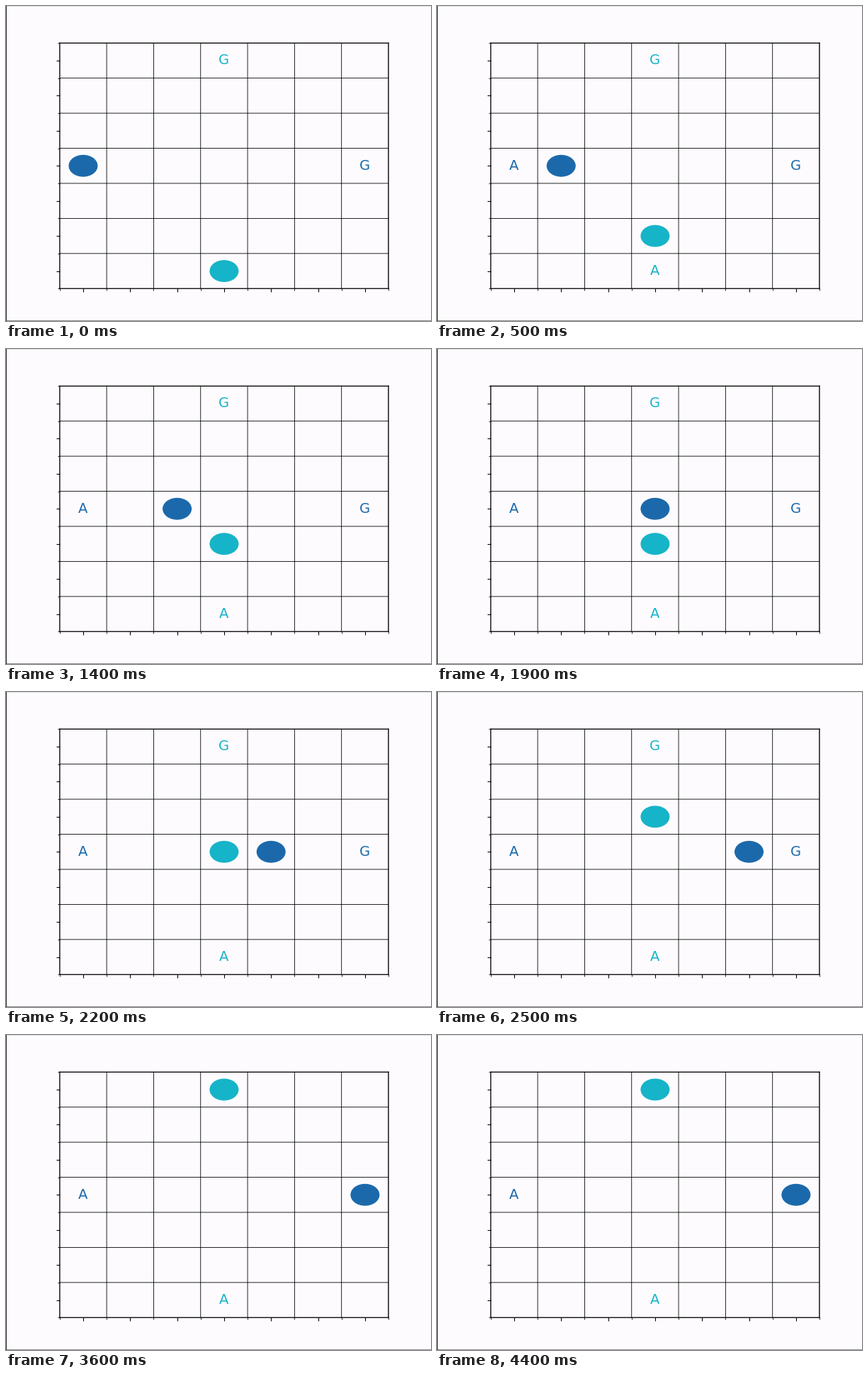
A matplotlib script for the animation above (4.5 s loop, 600 by 444 pixels).

```python
import matplotlib.pyplot as plt
from matplotlib.animation import FuncAnimation
from matplotlib.patches import Circle, Rectangle
from matplotlib.transforms import IdentityTransform

WIDTH, HEIGHT, DPI = 600, 444, 100
CELLS = 7
FRAMES, INTERVAL = 45, 100
PX = 72 / DPI  # points per pixel
PAPER, BLUE, TEAL = "#fdfbfe", "#1b69ab", "#16b4c8"

plt.rcParams["font.family"] = "DejaVu Sans"
plt.rcParams["path.snap"] = False  # soft lines at fractional positions

# Time at which each step begins, and the cell each agent occupies in it.
STEP_TIMES = [0, 500, 900, 1500, 2000, 2500, 2900, 3500]
BLUE_COLUMNS = [0, 1, 2, 3, 4, 5, 6, 6]
TEAL_ROWS = [0, 1, 2, 2, 3, 4, 5, 6]

fig = plt.figure(figsize=(WIDTH / DPI, HEIGHT / DPI), dpi=DPI, facecolor=PAPER)


def add_edge(x, y, width, height, color):
    fig.add_artist(Rectangle((x, y), width, height, facecolor=color,
                             linewidth=0, transform=IdentityTransform()))


add_edge(0, HEIGHT - 1, WIDTH, 1, "#dedde0")
add_edge(0, 0, WIDTH, 1, "#8a898c")
add_edge(0, 0, 1, HEIGHT, "#2a292b")

ax = fig.add_axes([75.8 / WIDTH, 45.7 / HEIGHT, 464.2 / WIDTH, 346.1 / HEIGHT],
                  facecolor=PAPER)
ax.set(xlim=(-0.5, CELLS - 0.5), ylim=(-0.5, CELLS - 0.5))
for axis in (ax.xaxis, ax.yaxis):
    axis.set_ticks(range(CELLS))
    axis.set_ticks([i - 0.5 for i in range(CELLS + 1)], minor=True)
ax.tick_params(which="major", length=4.6 * PX, width=1.1 * PX,
               labelbottom=False, labelleft=False)
ax.tick_params(which="minor", length=2.6 * PX, width=0.85 * PX)
ax.grid(which="minor", color="black", linewidth=0.85 * PX)
for spine in ax.spines.values():
    spine.set_linewidth(1.2 * PX)


def add_label(letter, cell, color):
    ax.text(*cell, letter, color=color, fontsize=19.5 * PX,
            ha="center", va="center")


def add_agent(start, goal, color):
    add_label("A", start, color)
    add_label("G", goal, color)
    return ax.add_patch(Circle(start, 0.3, facecolor=color, edgecolor=color,
                               linewidth=1.2 * PX, zorder=5))


blue = add_agent((0, 3), (6, 3), BLUE)
teal = add_agent((3, 0), (3, 6), TEAL)


def update(frame):
    step = sum(frame * INTERVAL >= t for t in STEP_TIMES) - 1
    blue.center = (BLUE_COLUMNS[step], 3)
    teal.center = (3, TEAL_ROWS[step])
    return blue, teal


anim = FuncAnimation(fig, update, frames=FRAMES, interval=INTERVAL,
                     repeat=True, repeat_delay=0, blit=False)
plt.show()
```
